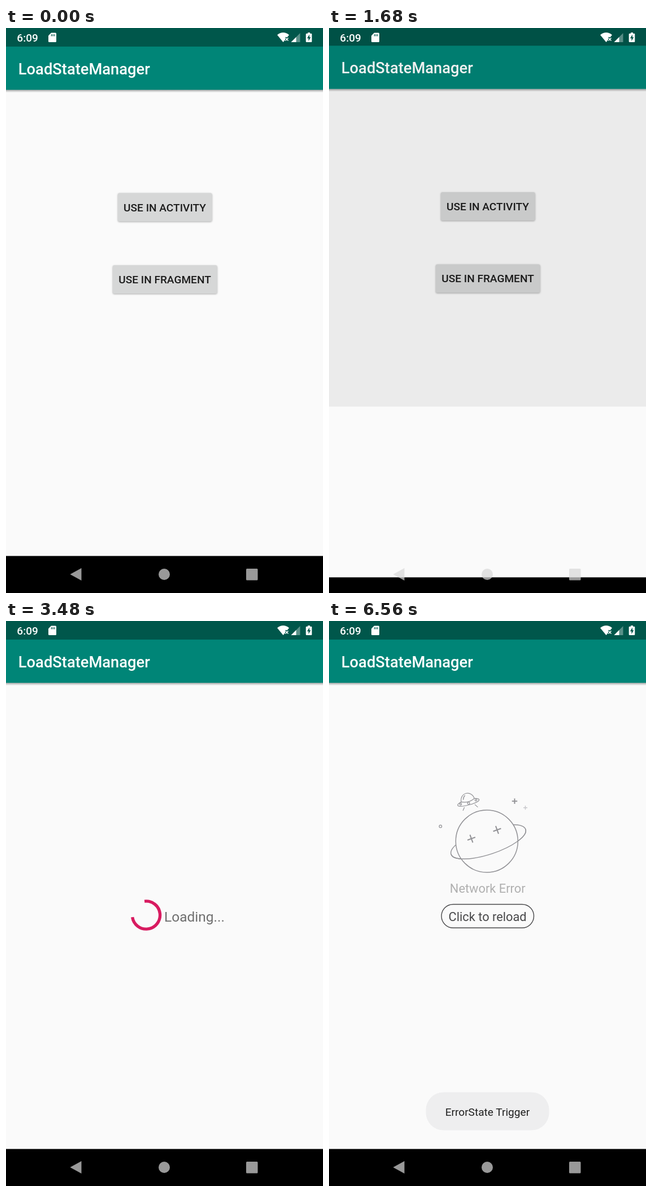
Recreate the animation shown at these times as an HTML page. Size 561 by 998 pixels, loop 7.92 s.

```html
<!DOCTYPE html>
<html lang="en">
<head>
<meta charset="utf-8">
<title>LoadStateManager</title>
<style>
html, body { margin: 0; width: 100%; height: 100%; overflow: hidden; background: #000; }
svg { display: block; width: 100%; height: 100%; font-family: Roboto, sans-serif; }
.medium { font-weight: 500; }
.mid { text-anchor: middle; }
.button rect { fill: #d6d7d7; filter: drop-shadow(0 1.5px 1.5px rgba(0,0,0,.32)); }
.button text { fill: #1c1c1c; font-size: 19.1px; font-weight: 500; text-anchor: middle; }
.line { fill: none; stroke: #929296; stroke-width: 1.5; }
</style>
</head>
<body>
<svg viewBox="0 0 561 998">
  <defs>
    <linearGradient id="shade" x2="0" y2="1">
      <stop offset="0" stop-color="#000" stop-opacity=".34"/>
      <stop offset="1" stop-color="#000" stop-opacity="0"/>
    </linearGradient>
    <clipPath id="reveal"><rect id="window" width="561" height="998"/></clipPath>
    <g id="screen">
      <rect width="561" height="998" fill="#fafafa"/>
      <rect y="109" width="561" height="5" fill="url(#shade)"/>
      <rect y="32" width="561" height="77.2" fill="#008577"/>
      <rect width="561" height="32.8" fill="#00574b"/>
      <rect y="932.6" width="561" height="66" fill="#000"/>
      <text class="medium" x="21.8" y="81.5" font-size="27.3" fill="#fff">LoadStateManager</text>
    </g>
    <path id="plus" d="M-1 0H1M0-1V1" vector-effect="non-scaling-stroke"/>
  </defs>

  <rect width="561" height="998"/>
  <g id="menu">
    <use href="#screen"/>
    <g class="button">
      <rect x="198" y="291.5" width="166.5" height="50" rx="2.7"/>
      <text x="281" y="324">USE IN ACTIVITY</text>
      <rect x="189" y="419" width="184.5" height="50" rx="2.7"/>
      <text x="281" y="451">USE IN FRAGMENT</text>
    </g>
  </g>

  <g id="task" clip-path="url(#reveal)">
    <use href="#screen"/>
    <g id="loading">
      <circle id="arc" cx="248" cy="519.5" r="24.6" pathLength="360" fill="none" stroke="#d81b60" stroke-width="5.4"/>
      <text x="280" y="531" font-size="24.5" fill="#6f6f6f">Loading...</text>
    </g>
    <g id="error">
      <g class="line">
        <ellipse cx="282" cy="390" rx="69.5" ry="22" transform="rotate(-18.4 282 390)"/>
        <circle cx="279.3" cy="389" r="55" fill="#fafafa"/>
        <path d="M-69.5 0A69.5 22 0 0 0 69.5 0" transform="translate(282 390) rotate(-18.4)"/>
        <g stroke-width="2">
          <use href="#plus" transform="translate(252 384.5) rotate(25) scale(7) rotate(45) scale(1.05)"/>
          <use href="#plus" transform="translate(297.5 369) rotate(25) scale(7) rotate(45) scale(1.05)"/>
          <use href="#plus" transform="translate(328.5 318.3) scale(4.7)"/>
        </g>
        <use href="#plus" transform="translate(347.5 329.7) scale(3.5)" stroke="#c8c8cc"/>
        <circle cx="197.3" cy="362.7" r="2.3" stroke-width="1.2"/>
        <g transform="translate(246 318) rotate(-15)" stroke-width="1.2">
          <path d="M-12-1A12 13 0 0 1 12-1M-7.5-4Q-6.5-9-2.5-11"/>
          <path d="M-12-1.5C-24 1-23 7 0 7S24 1 12-1.5Q0 4-12-1.5Z"/>
          <circle cx="-14" cy="2" r="1.6"/><circle cy="4" r="2"/><circle cx="14" cy="2" r="1.6"/>
          <path d="M-9 9L-13 14M10 9L14 15"/>
        </g>
      </g>
      <text class="mid" x="280.7" y="480" font-size="21.8" fill="#b0b0b0">Network Error</text>
      <rect x="199" y="500.5" width="163.5" height="41.5" rx="20.7" fill="none" stroke="#48484a" stroke-width="1.4"/>
      <text class="mid" x="280.6" y="529.5" font-size="21.8" fill="#48484a">Click to reload</text>
    </g>
  </g>

  <g id="toast">
    <rect x="171.5" y="832.5" width="218" height="67" rx="31" fill="#eeeeef"/>
    <text class="mid" x="280.4" y="874" font-size="19.1" fill="#202020">ErrorState Trigger</text>
  </g>

  <!-- system icons stay put while the windows move -->
  <g fill="#fff">
    <text class="medium" x="19.3" y="24" font-size="19.1">6:09</text>
    <path d="M80 8.5H87.5Q89 8.5 89 10V23.5Q89 25 87.5 25H76.5Q75 25 75 23.5V13.5Z"/>
    <path d="M480 12.2Q490.500 4 501 12.2L497.800 16.200H494V21L490.500 25Z"/>
    <path d="M494.500 17.500L499.500 22.500M499.500 17.500L494.500 22.500" stroke="#fff" stroke-width="1.5"/>
    <path d="M504.500 25L520.500 9V25Z" opacity=".35"/>
    <path d="M504.500 25L513.500 16V25Z"/>
    <path d="M534 8H538V9.700H540Q541.300 9.700 541.300 11V23.700Q541.300 25 540 25H532Q530.700 25 530.700 23.700V11Q530.700 9.700 532 9.700H534Z"/>
    <path d="M537 11.500L532.800 18.200H535.400V23L539.300 16.300H537Z" fill="#00574b"/>
    <path d="M80.500 11V14.500M83.200 11V14.500M85.900 11V14.500" stroke="#00574b" stroke-width="1.300"/>
  </g>
  <g fill="#d7d7d7" fill-opacity=".71">
    <path d="M113.500 965L133.500 954V976Z"/>
    <circle cx="280" cy="965" r="10"/>
    <rect x="425" y="955" width="20.500" height="20.500" rx="1.500"/>
  </g>
</svg>
<script>
const LOOP = 7920, STEP = 40, VISIT = 1600, OPEN = 12, CLOSE = 1175, SLIDE = 425;
const FAIL = 5400, TOAST = 5850, FADE = 690;
const $ = id => document.getElementById(id);
const clamp = x => Math.min(1, Math.max(0, x));
const show = (id, on) => $(id).style.display = on ? "" : "none";

// y at x on a cubic curve through (x0,y0) .. (x3,y3)
function curve(x, x0, y0, x1, y1, x2, y2, x3, y3) {
  const at = (s, a, b, c, d) => {
    const r = 1 - s;
    return r * r * r * a + 3 * r * r * s * b + 3 * r * s * s * c + s * s * s * d;
  };
  let lo = 0, hi = 1;
  for (let i = 0; i < 30; i++) {
    const m = (lo + hi) / 2;
    if (at(m, x0, x1, x2, x3) < x) lo = m; else hi = m;
  }
  return at(lo, y0, y1, y2, y3);
}
const slide = x => curve(x, 0, 0, .4, 0, .2, 1, 1, 1);
const wipe = x => x < 1 / 6
  ? curve(x, 0, 0, .05, 0, .1333, .06, 1 / 6, .4)
  : curve(x, 1 / 6, .4, .2083, .82, .25, 1, 1, 1);
const tail = x => x < .5 ? 0 : curve(x, .5, 0, .7, 0, .6, 1, 1, 1);
const head = x => x > .5 ? 1 : curve(x, 0, 0, .2, 0, .1, 1, .5, 1);

// time, cycles of growth, turn in degrees
const PACE = [[1880, .28, 52], [2680, .835, 196], [4320, 2.083, 436.5]];

function spin(t) {
  t = Math.min(t, 4320);
  const i = t < 2680 ? 0 : 1, a = PACE[i], b = PACE[i + 1];
  const k = (t - a[0]) / (b[0] - a[0]);
  const phase = (a[1] + (b[1] - a[1]) * k) % 1, turn = a[2] + (b[2] - a[2]) * k;
  const from = 270 * tail(phase), to = 270 * head(phase);
  $("arc").setAttribute("stroke-dasharray", `${to - from} 400`);
  $("arc").setAttribute("transform", `rotate(${turn + 90 * phase + from - 90} 248 519.5)`);
}

function draw(t) {
  const visit = t < VISIT ? t : t - VISIT;
  const closing = t >= CLOSE && t < VISIT;
  const p = clamp((closing ? t - CLOSE : visit - OPEN) / SLIDE);
  const e = closing ? 1 - slide(p) : slide(p);
  const w = closing ? 1 - wipe(p) : wipe(p);
  const dim = closing ? 1 - p : clamp((visit - OPEN) / 117);

  show("task", p > 0 || closing);
  $("task").setAttribute("transform", `translate(0 ${40.9 * (1 - e)})`);
  $("window").setAttribute("y", 957 * (1 - w));
  $("menu").setAttribute("transform", `translate(0 ${-20 * e})`);
  $("menu").setAttribute("opacity", 1 - .1 * dim);

  show("loading", t < FAIL);
  show("error", t >= FAIL);
  spin(visit + VISIT);
  const f = clamp((t - TOAST) / FADE);
  $("toast").setAttribute("opacity", 1 - (1 - f) ** 2);
}

const start = performance.now();
function frame() {
  const t = (performance.now() - start) % LOOP;
  draw(Math.floor(t / STEP) * STEP);
  requestAnimationFrame(frame);
}
frame();
</script>
</body>
</html>
```
